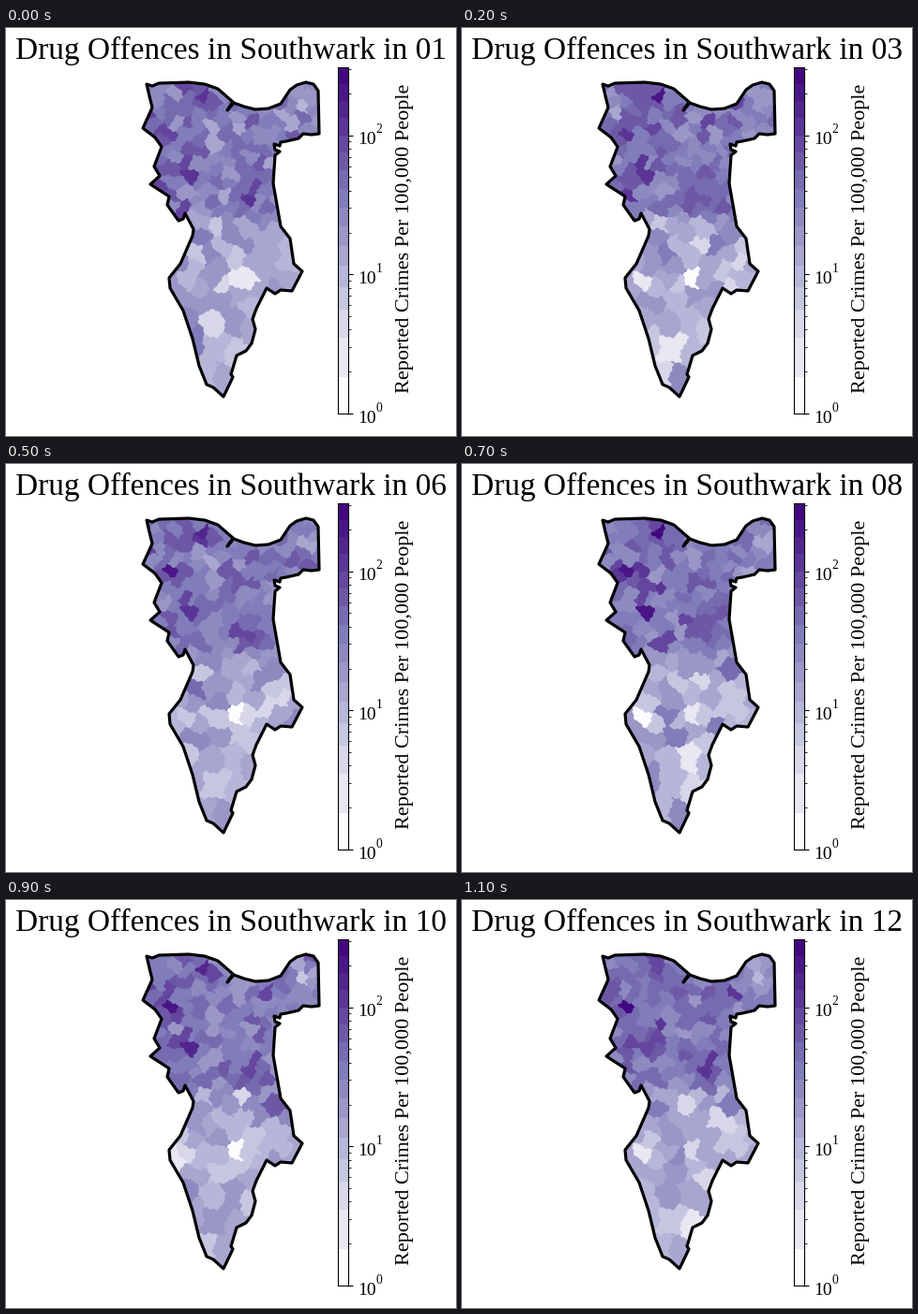
These frames come from a looping animation (480 px wide and 436 px high, 1200 ms). A matplotlib script:

```python
import numpy as np
import matplotlib.pyplot as plt
from matplotlib.animation import FuncAnimation
from matplotlib.patches import Polygon
from matplotlib.path import Path
from matplotlib.ticker import NullFormatter

plt.rcParams["font.family"] = "Liberation Serif"

W, H = 480, 436
BAR_X, BAR_Y, BAR_W, BAR_H = 354, 24, 11, 370  # from the lower left
DECADE = 148.7                                 # pixels per power of ten
X0, X1, Y0, Y1 = 140, 340, 50, 400             # map window

# Corners of the borough, clockwise
RIVER = [(150, 60), (156, 62), (163, 59), (195, 58), (212, 60), (226, 65),
         (242, 79), (236, 88), (243, 80), (254, 84), (266, 87), (280, 86),
         (293, 81), (303, 66), (310, 61), (320, 58), (328, 60), (333, 67),
         (334, 113)]
EAST = [(326, 114), (317, 113), (312, 118), (299, 121), (293, 122), (292, 126),
        (286, 124), (287, 130), (292, 132), (287, 136), (285, 166), (293, 212),
        (303, 225), (307, 252), (316, 260), (305, 281), (293, 280), (287, 284),
        (278, 278), (267, 300), (263, 311), (266, 322), (262, 337), (256, 345),
        (246, 350), (240, 370), (242, 373), (232, 394)]
WEST = [(221, 384), (214, 381), (206, 361), (199, 332), (189, 302), (175, 278),
        (174, 267), (186, 252), (199, 222), (200, 215), (191, 198), (189, 204),
        (184, 206), (172, 189), (174, 180), (154, 167), (164, 158), (158, 148),
        (166, 127), (159, 117), (146, 107), (156, 85), (153, 73)]
BORDER = RIVER + EAST + WEST

# High and low spots: x, y, radius, change of the log10 rate
SPOTS = [(211, 74, 11, 0.65), (175, 115, 7, 0.75), (196, 158, 8, 0.35),
         (258, 184, 14, 0.4), (317, 84, 11, -0.6), (245, 268, 11, -0.9),
         (193, 268, 8, -0.5), (295, 250, 20, -0.25), (224, 340, 28, -0.3)]

# Colour steps, as log10 rates
STEPS = np.r_[0, 39, 81 + 289 * np.linspace(0, 1, 15) ** 0.86] / DECADE
MIDS = (STEPS[:-1] + STEPS[1:]) / 2
MIDS[0] = 0
COLORS = plt.get_cmap("Purples")(MIDS / STEPS[-1])[:, :3]


def make_sites():
    """Seeded points kept apart, wider towards the south."""
    rng = np.random.default_rng(12)
    shape = Path(BORDER)
    sites = [spot[:2] for spot in SPOTS]
    for p in rng.uniform((X0, Y0), (X1, Y1), (6000, 2)):
        if shape.contains_point(p):
            space = np.interp(p[1], [195, 225, 275, 300], [10, 13, 13, 20])
            if np.hypot(*(np.array(sites) - p).T).min() > space:
                sites.append(tuple(p))
    return np.array(sites)


def label_map(sites):
    """Nearest weighted site at twice the resolution, with ragged borders."""
    y, x = np.mgrid[Y0 + 0.25:Y1:0.5, X0 + 0.25:X1:0.5]
    u = x + 2.2 * np.sin(0.27 * y + 0.09 * x) + 0.8 * np.sin(0.9 * y - 0.3 * x)
    v = y + 2.2 * np.sin(0.24 * x - 0.11 * y) + 0.8 * np.sin(0.8 * x + 0.4 * y)
    weights = np.random.default_rng(3).uniform(0, 55, len(sites))
    best = np.full(x.shape, np.inf)
    label = np.zeros(x.shape, int)
    for i, ((sx, sy), weight) in enumerate(zip(sites, weights)):
        d = (u - sx) ** 2 + (v - sy) ** 2 - weight
        near = d < best
        best[near] = d[near]
        label[near] = i
    return label


def usual_rates(x, y):
    rate = 1.13 + 0.42 / (1 + np.exp((y - 208) / 6))
    rate += 0.1 * (x < 200) * (y < 200)
    for sx, sy, radius, change in SPOTS:
        rate += change * np.exp(-((x - sx) ** 2 + (y - sy) ** 2) / radius ** 2)
    return rate + np.random.default_rng(5).normal(0, 0.1, len(x))


SITES = make_sites()
LABELS = label_map(SITES)
USUAL = usual_rates(*SITES.T)
SPREAD = np.where(SITES[:, 1] < 208, 0.14, 0.2)


def map_image(month):
    noise = np.random.default_rng(100 + month).normal(0, 1, len(SITES))
    step = np.digitize(USUAL + SPREAD * noise, STEPS) - 1
    rgb = COLORS[step.clip(0, len(COLORS) - 1)][LABELS]
    return rgb.reshape(Y1 - Y0, 2, X1 - X0, 2, 3).mean(axis=(1, 3))


fig = plt.figure(figsize=(W / 100, H / 100), dpi=100, facecolor="white")
stage = fig.add_axes([0, 0, 1, 1])
stage.axis("off")
area = stage.imshow(map_image(1), extent=(X0, X1, Y1, Y0),
                    interpolation="nearest", aspect="auto")
area.set_clip_path(Path(BORDER + BORDER[:1]), stage.transData)
stage.add_patch(Polygon(BORDER, fill=False, ec="black", lw=2.3,
                        joinstyle="round"))
stage.set_ylim(H, 0)
title = stage.text(W / 2, 33, "", fontsize=24, ha="center", va="baseline")
stage.text(430, 225.3, "Reported Crimes Per 100,000 People", fontsize=16,
           rotation=90, rotation_mode="anchor", ha="center", va="baseline")
for power in range(3):
    base = H - BAR_Y - power * DECADE + 9.5
    stage.text(375, base, "10", fontsize=14)
    stage.text(394.4, base - 11.8, str(power), fontsize=9.8)

bar = fig.add_axes([0, 0, 0.1, 0.1])
bar.set_yscale("log")
for low, color in zip(STEPS, COLORS):
    bar.axhspan(10 ** low, 10 ** STEPS[-1], color=color, lw=0)
bar.set_xlim(0, 1)
bar.set_ylim(1, 10 ** STEPS[-1])
bar.set_xticks([])
bar.yaxis.tick_right()
bar.yaxis.set_major_formatter(NullFormatter())
bar.yaxis.set_minor_formatter(NullFormatter())


def update(k):
    month = k + 1
    shift = 1 if month == 11 else 0  # the narrower title moves the layout
    title.set_text(f"Drug Offences in Southwark in {month:02d}")
    area.set_data(map_image(month))
    stage.set_xlim(shift, W + shift)
    bar.set_position([(BAR_X - shift) / W, BAR_Y / H, BAR_W / W, BAR_H / H])


anim = FuncAnimation(fig, update, frames=12, interval=100, repeat=True,
                     repeat_delay=0)
plt.show()
```
